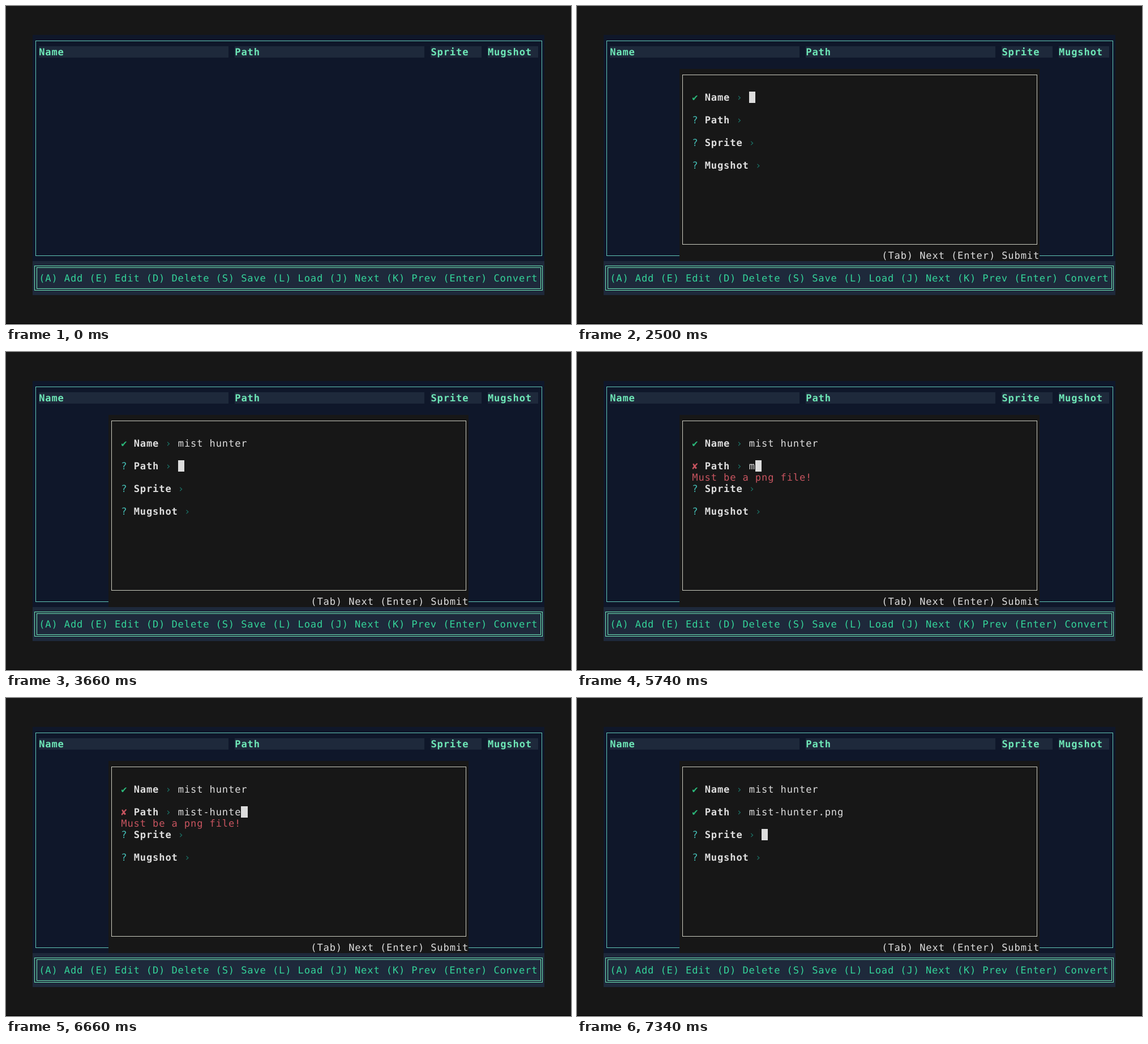
These frames come from a looping animation (998x561 px, 8000 ms). An HTML page:

```html
<!DOCTYPE html>
<html lang="en">
<head>
<meta charset="utf-8">
<title>Terminal form</title>
<style>
  html, body { margin: 0; width: 100%; height: 100%; overflow: hidden; background: #171717; }
  svg { display: block; width: 100%; height: 100%; }
  rect { shape-rendering: crispEdges; }
  text {
    font: 17.14px "DejaVu Sans Mono", monospace;
    letter-spacing: .846px;
    white-space: pre;
    text-rendering: geometricPrecision;
  }
  .bold { font-weight: bold; }
</style>
</head>
<body>
<svg id="stage" viewBox="0 0 998 561">
  <g id="table"></g>
  <g id="dialog"></g>
</svg>
<script>
const LOOP = 8000;
const CELL = { x: 47, y: 51.2, w: 11.165, h: 19.95, ascent: 15.9 };
const COLOR = {
  back: '#171717', panel: '#0f172a', bar: '#1e293b',
  head: '#6ee7b7', menu: '#34d399', frame: '#62c8b8', menuFrame: '#6ee7b7',
  fore: '#dddddd', dialogFrame: '#cccdc0',
  ask: '#44bdb4', arrow: '#1a7468', ok: '#2bb87a', error: '#c7545f'
};

const OPEN = 500;
const NAME = {
  text: 'mist hunter', check: 2500, leave: 3660,
  keys: [2540, 2620, 2740, 2820, 2940, 3020, 3140, 3260, 3340, 3500, 3580]
};
const PATH = {
  text: 'mist-hunter.png', fail: 5740, check: 7220, leave: 7340,
  keys: [5740, 5820, 5980, 6060, 6140, 6300, 6340, 6500, 6580, 6660, 6820, 6900, 7020, 7100, 7260]
};

const colX = col => CELL.x + col * CELL.w;
const rowY = row => CELL.y + row * CELL.h;

const text = (col, row, value, fill, bold) =>
  `<text x="${colX(col)}" y="${rowY(row) + CELL.ascent}" fill="${fill}"${bold ? ' class="bold"' : ''}>${value}</text>`;

function block(col, row, cols, rows, fill) {
  const [x, y, right, bottom] = [colX(col), rowY(row), colX(col + cols), rowY(row + rows)].map(Math.round);
  return `<rect x="${x}" y="${y}" width="${right - x}" height="${bottom - y}" fill="${fill}"/>`;
}

const outline = (left, top, right, bottom, color) =>
  `<rect x="${left + .5}" y="${top + .5}" width="${right - left}" height="${bottom - top}" fill="none" stroke="${color}"/>`;

function drawTable() {
  const headers = [['Name', 1, 30], ['Path', 32, 30], ['Sprite', 63, 8], ['Mugshot', 72, 8]];
  const menu = '(A) Add (E) Edit (D) Delete (S) Save (L) Load (J) Next (K) Prev (Enter) Convert';
  return '<rect y="560" width="998" height="1" fill="#000"/>' +
    block(0, 0, 81, 20, COLOR.panel) +
    outline(52, 61, 946, 440, COLOR.frame) +
    headers.map(([label, col, width]) =>
      block(col, 1, width, 1, COLOR.bar) + text(col, 1, label, COLOR.head, true)).join('') +
    block(0, 20, 81, 3, COLOR.bar) +
    outline(50, 458, 947, 501, COLOR.menuFrame) +
    outline(54, 461, 944, 498, COLOR.menuFrame) +
    text(1, 21, menu, COLOR.menu);
}

function field(row, label, status, value, focused) {
  const [mark, color] = { ask: ['?', COLOR.ask], ok: ['✔', COLOR.ok], error: ['✘', COLOR.error] }[status];
  const arrowCol = 17 + label.length;
  return text(14, row, mark, color) +
    text(16, row, label, COLOR.fore, true) +
    text(arrowCol, row, '›', COLOR.arrow) +
    text(arrowCol + 2, row, value, COLOR.fore) +
    (focused ? block(arrowCol + 2 + value.length, row, 1, 1, COLOR.fore) : '') +
    (status === 'error' ? text(14, row + 1, 'Must be a png file!', COLOR.error) : '');
}

const typed = (input, time) => input.text.slice(0, input.keys.filter(key => key <= time).length);
const statusOf = (input, time) =>
  time >= input.check ? 'ok' : time >= input.fail ? 'error' : 'ask';

function drawDialog(time) {
  if (time < OPEN) return '';
  return block(12, 3, 57, 17, COLOR.back) +
    outline(186, 121, 812, 420, COLOR.dialogFrame) +
    field(5, 'Name', statusOf(NAME, time), typed(NAME, time), time < NAME.leave) +
    field(7, 'Path', statusOf(PATH, time), typed(PATH, time), time >= NAME.leave && time < PATH.leave) +
    field(9, 'Sprite', 'ask', '', time >= PATH.leave) +
    field(11, 'Mugshot', 'ask', '', false) +
    text(44, 19, '(Tab) Next (Enter) Submit', COLOR.fore);
}

const dialog = document.getElementById('dialog');
document.getElementById('table').innerHTML = drawTable();

let shown = '';
const start = performance.now();
function tick() {
  const markup = drawDialog((performance.now() - start) % LOOP);
  if (markup !== shown) dialog.innerHTML = shown = markup;
  requestAnimationFrame(tick);
}
tick();
</script>
</body>
</html>
```
